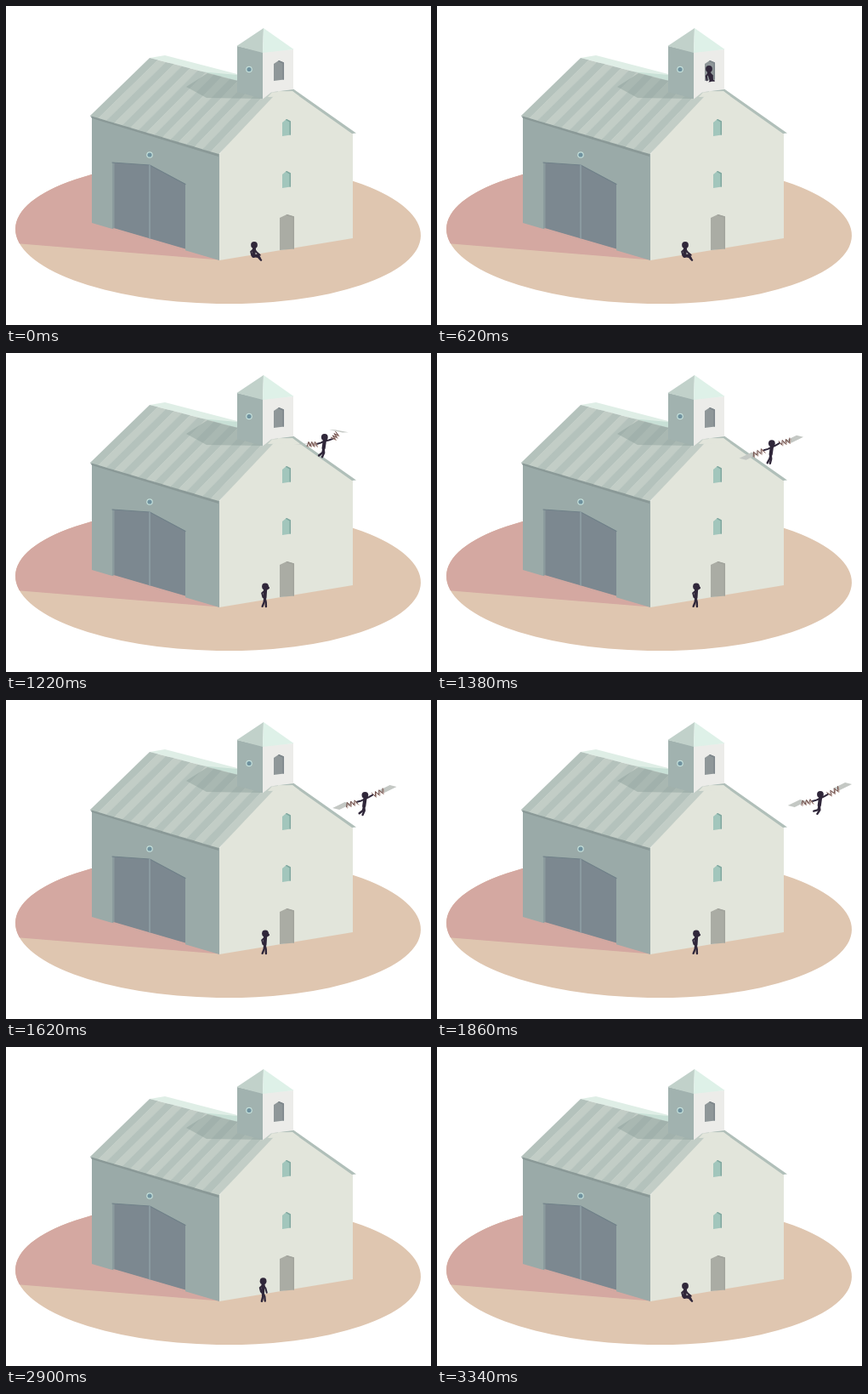
These frames come from a looping animation (500 px wide and 375 px high, 4.54 s). An HTML page with a canvas:

```html
<!DOCTYPE html>
<html lang="en">
<head>
<meta charset="utf-8">
<title>Bell tower flight</title>
<style>
html, body { margin: 0; width: 100%; height: 100%; overflow: hidden; background: #fff; }
canvas { display: block; }
</style>
</head>
<body>
<canvas width="500" height="375"></canvas>
<script>
const ctx = document.querySelector('canvas').getContext('2d');
const LOOP = 4540;
const INK = '#30273a';

const mix = (a, b, k) => a + (b - a) * k;
const clamp = (v, lo, hi) => Math.min(hi, Math.max(lo, v));
const ramp = (t, from, to) => clamp((t - from) / (to - from), 0, 1);
const ease = (t, from, to) => {
  const k = ramp(t, from, to);
  return k * k * (3 - 2 * k);
};

function trace(points) {
  ctx.beginPath();
  for (let i = 0; i < points.length; i += 2) ctx.lineTo(points[i], points[i + 1]);
}
function poly(color, ...points) {
  trace(points);
  ctx.closePath();
  ctx.fillStyle = color;
  ctx.fill();
}
function line(color, width, ...points) {
  trace(points);
  ctx.strokeStyle = color;
  ctx.lineWidth = width;
  ctx.stroke();
}
function disc(color, x, y, r) {
  ctx.beginPath();
  ctx.arc(x, y, r, 0, Math.PI * 2);
  ctx.fillStyle = color;
  ctx.fill();
}
function porthole(x, y) {
  disc('#c3dfda', x, y, 3.8);
  disc('#6f929f', x, y, 2.6);
}

// Pointed opening in the front wall, with its right jamb showing.
function traceOpening(x, y, w, h) {
  trace([x, y + 4, x + w / 2, y, x + w, y + 2.5, x + w, y + h - 1.5, x, y + h]);
  ctx.closePath();
}
function opening(color, jamb, x, y, w, h) {
  traceOpening(x, y, w, h);
  ctx.fillStyle = color;
  ctx.fill();
  line(jamb, 1.5, x + w / 2, y + 0.7, x + w - 0.7, y + 3, x + w - 0.7, y + h - 2);
}

function drawGround() {
  ctx.save();
  ctx.beginPath();
  ctx.ellipse(249.5, 266, 238.5, 84, Math.PI / 180, 0, Math.PI * 2);
  ctx.clip();
  ctx.fillStyle = '#dfc6b0';
  ctx.fillRect(0, 150, 500, 225);
  poly('#d4a8a1', 0, 278, 251, 298.5, 251, 150, 0, 150);
  ctx.restore();
}

function drawWalls() {
  poly('#9aaaa8', 101, 128, 251, 172, 251, 299, 101, 255);
  poly('#e2e5db', 251, 174, 313, 101, 338, 98, 408, 148, 408, 273, 251, 299);

  // The gate is set back, so a strip of ground shows under it.
  poly('#d4a8a1', 125, 260, 211, 285, 211, 287.5, 125, 262.3);
  poly('#7c8890', 125, 184, 169, 187, 211, 209, 211, 285.5, 125, 260.5);
  poly('#8b9b9e', 125, 184, 127.5, 185, 127.5, 261, 125, 262);
  line('#708189', 1.2, 125, 184, 169, 187, 211, 209.5);
  line('#93a5a9', 1.3, 169, 187, 169, 273);
  porthole(169, 175);

  for (const y of [133, 194]) opening('#a2c6bc', '#80a79f', 325, y, 10, 20);
  opening('#aaaca4', '#a2a49d', 322, 245, 17, 42);
}

function drawRoof() {
  poly('#dfeee6', 169, 61, 187, 58, 272, 80, 320, 100);
  poly('#c8e0d6', 233, 77.5, 272, 81, 272, 89, 237, 79);
  poly('#8a9997', 99, 129, 250, 173, 250, 177, 101, 132);

  const count = 16;
  for (let i = 0; i < count; i++) {
    const a = i / count, b = (i + 1) / count;
    poly(i % 2 ? '#c2cdc6' : '#b4c2bc',
      169 + 151 * a, 61 + 39 * a, 169.5 + 151 * b, 61 + 39 * b,
      99.5 + 151 * b, 129 + 45 * b, 99 + 151 * a, 129 + 45 * a);
  }
  poly('rgba(128,150,144,.38)', 212, 95, 237, 79, 272, 88, 302, 96, 302, 109, 236, 108);
  poly('#b0bfb9', 318, 100, 338, 97.5, 412, 149.5, 407, 150, 337, 100.5);
  poly('#e2e5db', 313, 101.5, 337, 100, 345, 106, 308, 107);
}

function drawTower() {
  poly('#a1b2af', 272, 47, 302, 54, 302, 109, 272, 101);
  poly('#ecece9', 302, 54, 338, 51, 338, 98, 318, 100.5, 312, 101.5, 302, 109.5);
  poly('#c1d1ca', 303, 26, 271.5, 47, 302, 55);
  poly('#def1e8', 303, 26, 338.5, 51, 302, 55);
  porthole(286, 74.5);
  opening('#8f9799', '#7d868b', 315, 64, 12, 24);
}

// Angles are in degrees: 0 hangs down, positive swings to the right.
function reach([x, y], angle, length) {
  const a = angle * Math.PI / 180;
  return [x + Math.sin(a) * length, y + Math.cos(a) * length];
}
function limb(width, start, length, upper, lower) {
  const joint = reach(start, upper, length);
  const end = reach(joint, lower, length);
  line(INK, width, ...start, ...joint, ...end);
  return end;
}

// Draws a figure around its head; each leg and arm is [upper, lower]. Returns the hands.
function drawFigure({ torso, legs, arms }) {
  const neck = [0, 4.5];
  const hip = reach(neck, torso, 8.5);
  line(INK, 4.2, ...neck, ...hip);
  for (const leg of legs) limb(2.4, hip, 5.4, ...leg);
  disc(INK, 0, 0, 3.9);
  return arms.map(arm => limb(2, neck, 5, ...arm));
}

function drawWatcher(t) {
  const up = ease(t, 660, 920) - ease(t, 2780, 3340);
  const look = ease(t, 780, 960) - ease(t, 1900, 2180);
  ctx.save();
  ctx.translate(292 + 12 * up + look, 281 - 6.5 * up);
  drawFigure({
    torso: mix(-6, -4, up),
    legs: [[mix(82, -8, up), mix(42, -22, up)], [mix(108, 14, up), mix(30, 2, up)]],
    arms: [[-50, 14], [mix(35, 125, look), mix(50, 215, look) - 40 * up * (1 - look)]]
  });
  ctx.restore();
}

function drawLattice([x0, y0], [x1, y1]) {
  const length = Math.hypot(x1 - x0, y1 - y0) || 1;
  const nx = (y0 - y1) / length * 2.6, ny = (x1 - x0) / length * 2.6;
  const steps = 6;
  for (const [color, shift] of [['#b39a92', 1.2], ['#6d4c48', 0]]) {
    const zigzag = [];
    for (let i = 0; i <= steps; i++) {
      const side = i % 2 ? 1 : -1;
      zigzag.push(mix(x0, x1, i / steps) + nx * side + shift,
        mix(y0, y1, i / steps) + ny * side + shift);
    }
    line(color, 1, ...zigzag);
  }
}

// The panels swing from folded, close to the body, to one slanted line.
function drawWing(side, hand, open, lift, size) {
  const right = side > 0;
  const x = mix(right ? 1 : -20, right ? 26 : -27, open) * size;
  const y = mix(right ? -11 : -4, 5 - side * 10 - lift, open) * size;
  const angle = mix(right ? 75 : 28, -26, open) * Math.PI / 180;
  const ax = Math.cos(angle) * 8 * size, ay = Math.sin(angle) * 8 * size;
  const cx = mix(2.5, 4, open) * size, cy = mix(-2, 1, open) * size;
  poly('#c4c8c4', x - ax - cx, y - ay - cy, x + ax - cx, y + ay - cy,
    x + ax + cx, y + ay + cy, x - ax + cx, y - ay + cy);
  drawLattice(hand, [mix(x, hand[0], 0.25), mix(y, hand[1], 0.25)]);
}

function drawFlyer(t) {
  if (t < 300 || t >= 2180) return;
  const x = clamp(351 + 0.119 * (t - 1020), 320, 459);
  const d = x - 351;
  const y = Math.max(74, 86 + 0.64 * d - 0.0039 * d * d) + 18 * (1 - ease(t, 300, 460));
  const out = ease(t, 700, 880);
  const open = ease(t, 1020, 1360);
  const swing = Math.cos((t - 1020) / 400 * Math.PI);

  ctx.save();
  if (t < 760) {
    traceOpening(315, 64, 12, 26);
    ctx.clip();
  }
  ctx.globalAlpha = 1 - ramp(t, 1940, 2180);
  ctx.translate(x, y);
  const hands = drawFigure({
    torso: mix(18, -8, out),
    legs: [
      [mix(-30, -14, out), mix(-10, -52 - 24 * swing, out)],
      [mix(60, 6, out), mix(-10, -24 - 10 * swing, out)]
    ],
    arms: [
      [mix(-40, -65, out), mix(10, -75, out)],
      [mix(50, mix(80, 115, open), out), mix(0, mix(90, 120, open), out)]
    ]
  });
  const size = ease(t, 800, 980);
  if (size > 0) {
    const lift = 4.5 * ramp(t, 1380, 1860);
    hands.forEach((hand, i) => drawWing(i ? 1 : -1, hand, open, lift, size));
  }
  ctx.restore();
}

function render(now) {
  const time = now % LOOP;
  const t = time < 300 ? 0 : Math.floor((time - 20) / 40) * 40 + 20;
  ctx.fillStyle = '#fff';
  ctx.fillRect(0, 0, 500, 375);
  ctx.lineCap = ctx.lineJoin = 'round';
  drawGround();
  drawWalls();
  drawRoof();
  drawTower();
  drawWatcher(t);
  drawFlyer(t);
}

const begin = performance.now();
function tick() {
  render(performance.now() - begin);
  requestAnimationFrame(tick);
}
tick();
</script>
</body>
</html>
```
